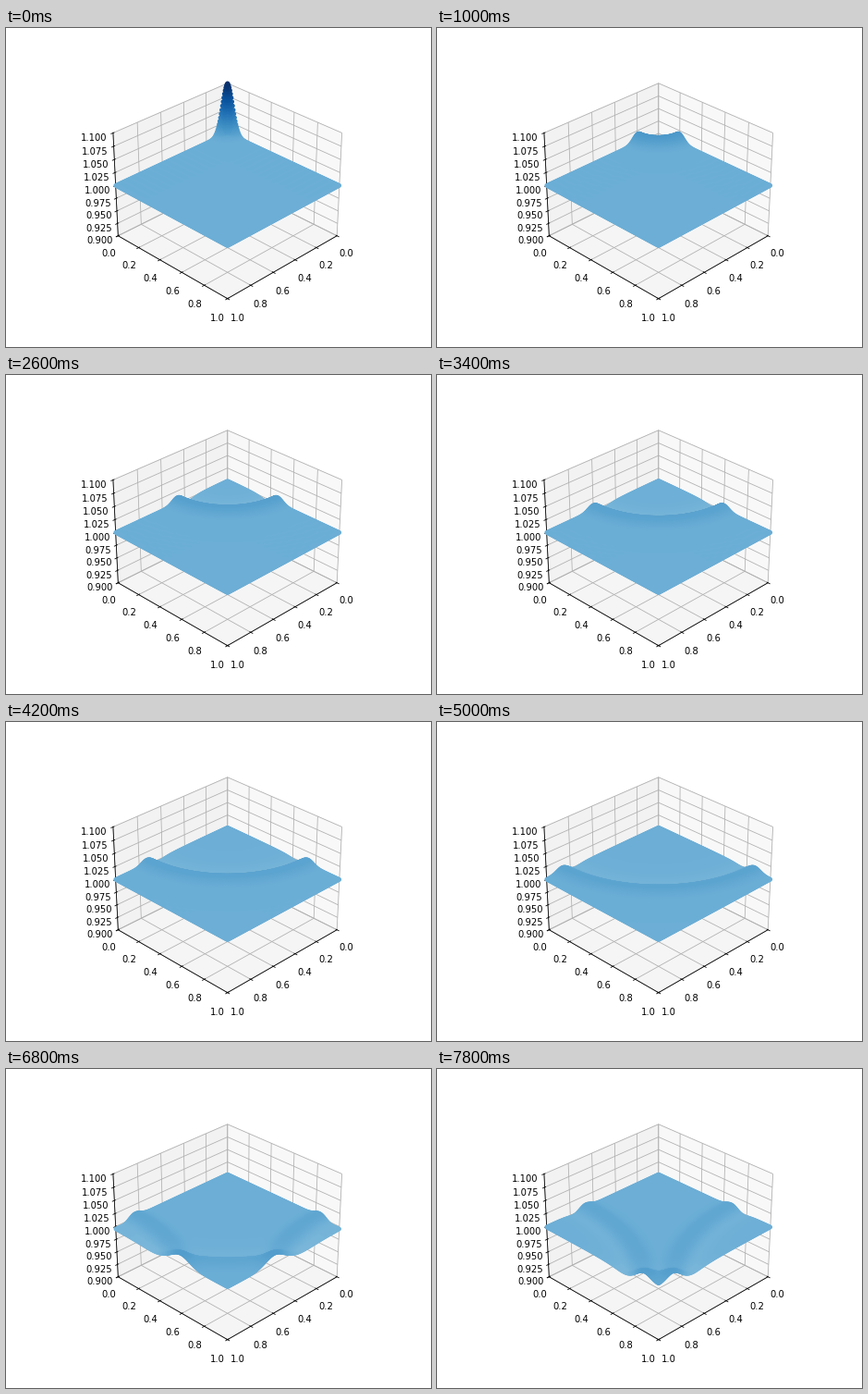
Write a matplotlib script that moves like this. It is 460 by 345 pixels and loops after 8 s.

```python
import numpy as np
import matplotlib.pyplot as plt
from matplotlib.animation import FuncAnimation

FRAMES, INTERVAL = 40, 200
POINTS, MODES = 160, 36
AMP, SIGMA = 0.1, 0.05
SPEED = 0.0336  # distance travelled by the wave per frame

# Cosine series of a Gaussian bump in the corner of a closed unit basin
m = np.arange(MODES)
coef = SIGMA * np.sqrt(2 * np.pi) * np.exp(-(m * np.pi * SIGMA) ** 2 / 2)
coef[0] /= 2
weights = AMP * np.outer(coef, coef)
omega = np.pi * np.hypot(m[:, None], m[None, :])

s = np.linspace(0, 1, POINTS)
basis = np.cos(np.pi * np.outer(s, m))
X, Y = np.meshgrid(s, s, indexing="ij")


def height(dist):
    return 1 + basis @ (weights * np.cos(omega * dist)) @ basis.T


fig = plt.figure(figsize=(6.4, 4.8), dpi=72)
ax = fig.add_subplot(projection="3d")
ax.view_init(elev=30, azim=45)
ax.set(xlim=(0, 1), ylim=(0, 1), zlim=(0.9, 1.1))
cmap = plt.get_cmap("Blues")
water = []


def draw(i):
    while water:
        water.pop().remove()
    z = height(SPEED * i).ravel()
    colors = cmap((z - 0.9) / 0.2)
    water.append(ax.scatter(X.ravel(), Y.ravel(), z, s=20, c=colors,
                            linewidths=0, depthshade=False))
    return water


anim = FuncAnimation(fig, draw, frames=FRAMES, interval=INTERVAL,
                     init_func=lambda: draw(0), repeat=True, repeat_delay=0)
plt.show()
```
